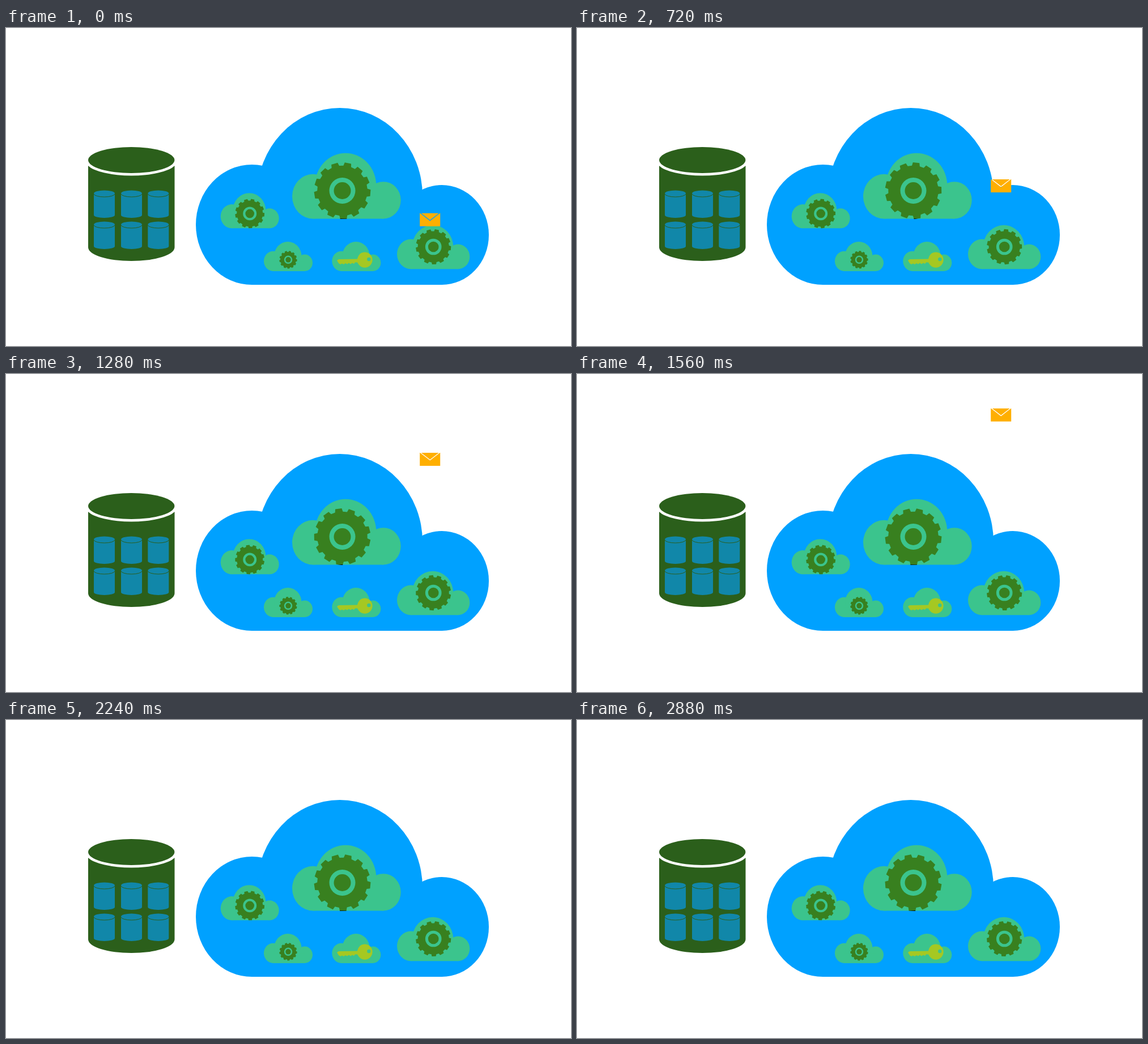
These frames come from a looping animation (997 px wide and 561 px high, 2.92 s). An HTML page:

```html
<!DOCTYPE html>
<html>
<head>
<meta charset="utf-8">
<title>Cloud services</title>
<style>
html, body { margin: 0; width: 100%; height: 100%; overflow: hidden; background: #fff; }
svg { display: block; width: 997px; height: 561px; }
</style>
</head>
<body>
<svg viewBox="0 0 997 561">
  <defs>
    <g id="cloud">
      <ellipse cx="99" cy="206" rx="99" ry="106"/>
      <ellipse cx="254" cy="155" rx="146" ry="155"/>
      <ellipse cx="434" cy="224" rx="83" ry="88"/>
      <path d="M99 206H434V312H99z"/>
    </g>
    <g id="jar">
      <path d="M0 5.5A18.5 5.5 0 0 1 37 5.5V43.5A18.5 5 0 0 1 0 43.5z" fill="#1187a9"/>
      <path d="M0 6A18.5 5.5 0 0 0 37 6" fill="none" stroke="#2b5f1b"/>
    </g>
    <path id="teeth"/>
    <clipPath id="below"><path d="M500 336H700V340H500z"/></clipPath>
  </defs>

  <g fill="#2b5f1b">
    <path d="M145 243A80 25 0 0 0 297.5 243V387A76.2 24 0 0 1 145 387z"/>
    <ellipse cx="221.2" cy="233" rx="76.2" ry="23"/>
  </g>
  <g id="jars"></g>

  <use href="#cloud" x="335" y="141" fill="#00a1ff"/>
  <g id="clouds" fill="#3bc48d"></g>
  <g id="gears"></g>
  <g clip-path="url(#below)"><use id="edge" href="#teeth"/></g>

  <path fill="#a5c822" fill-rule="evenodd" d="M584 410L587 408L620 407.5C622 399 627 395.5 633 395.5A13.6 13.6 0 0 1 633 422.7C627 422.7 623 419 620 413.5L616 413.5L614 416L611 414.5L608 416.5L605 414.5L602 416.5L599 415L596 417L593 415.5L590 417L587 415zM643.5 408a3.2 3.2 0 1 0 -6.4 0a3.2 3.2 0 1 0 6.4 0z"/>
  <path id="mail" fill="#ffaf00" d="M2.5 0H33.5L18 12zM0 0H.5L18 13.6L35.5 0H36V23H0z"/>
</svg>
<script>
const LOOP = 2920, STEP = 40, TEETH = 13;
const $ = id => document.getElementById(id);

function add(parent, tag, attrs) {
  const el = document.createElementNS('http://www.w3.org/2000/svg', tag);
  for (const k in attrs) el.setAttribute(k, attrs[k]);
  return $(parent).appendChild(el);
}

function gearPath() {
  const pts = [];
  for (let i = 0; i < TEETH; i++)
    for (const [r, off] of [[44.3, -9], [50, -6.6], [50, 6.6], [44.3, 9]]) {
      const a = (i * 360 / TEETH + off - 90) * Math.PI / 180;
      pts.push((r * Math.cos(a)).toFixed(2) + ' ' + (r * Math.sin(a)).toFixed(2));
    }
  return 'M' + pts.join('L') + 'z';
}
$('teeth').setAttribute('d', gearPath());

for (const y of [286.5, 341.5])
  for (const x of [155, 203, 250.3]) add('jars', 'use', { href: '#jar', x, y });

// x, y, width
for (const [x, y, w] of [[505, 220.7, 191.7], [378.7, 291.2, 103], [455, 377, 86], [575.3, 377, 86], [690, 347.8, 128.3]])
  add('clouds', 'use', { href: '#cloud', transform: `translate(${x} ${y}) scale(${w / 517})` });

// centre x, centre y, scale
const gears = [[593.5, 287, 1], [430.2, 327.4, .52], [498, 408.8, .314], [754.2, 386, .623]].map(([x, y, s]) => {
  const place = `translate(${x} ${y}) scale(${s})`;
  const wheel = add('gears', 'use', { href: '#teeth', fill: '#38801f' });
  add('gears', 'circle', { r: 23, fill: '#3bc48d', transform: place });
  add('gears', 'circle', { r: 15, fill: '#38801f', transform: place });
  return { wheel, place };
});
gears.push({ wheel: $('edge'), place: gears[0].place });

// cubic-bezier(.42, 0, .58, 1)
function easeInOut(x) {
  let lo = 0, hi = 1;
  for (let i = 0; i < 24; i++) {
    const s = (lo + hi) / 2, q = 1 - s;
    if (1.26 * s * q * q + 1.74 * s * s * q + s * s * s < x) lo = s; else hi = s;
  }
  return lo * lo * (3 - 2 * lo);
}

function draw(now) {
  const p = Math.floor(now % LOOP / STEP) * STEP / LOOP;
  for (const { wheel, place } of gears)
    wheel.setAttribute('transform', `${place} rotate(${11.5 - 360 * p})`);
  $('mail').setAttribute('transform', `translate(730.2 ${326.8 - 476 * easeInOut(p)})`);
}

const start = performance.now();
function tick() {
  draw(performance.now() - start);
  requestAnimationFrame(tick);
}
tick();
</script>
</body>
</html>
```
